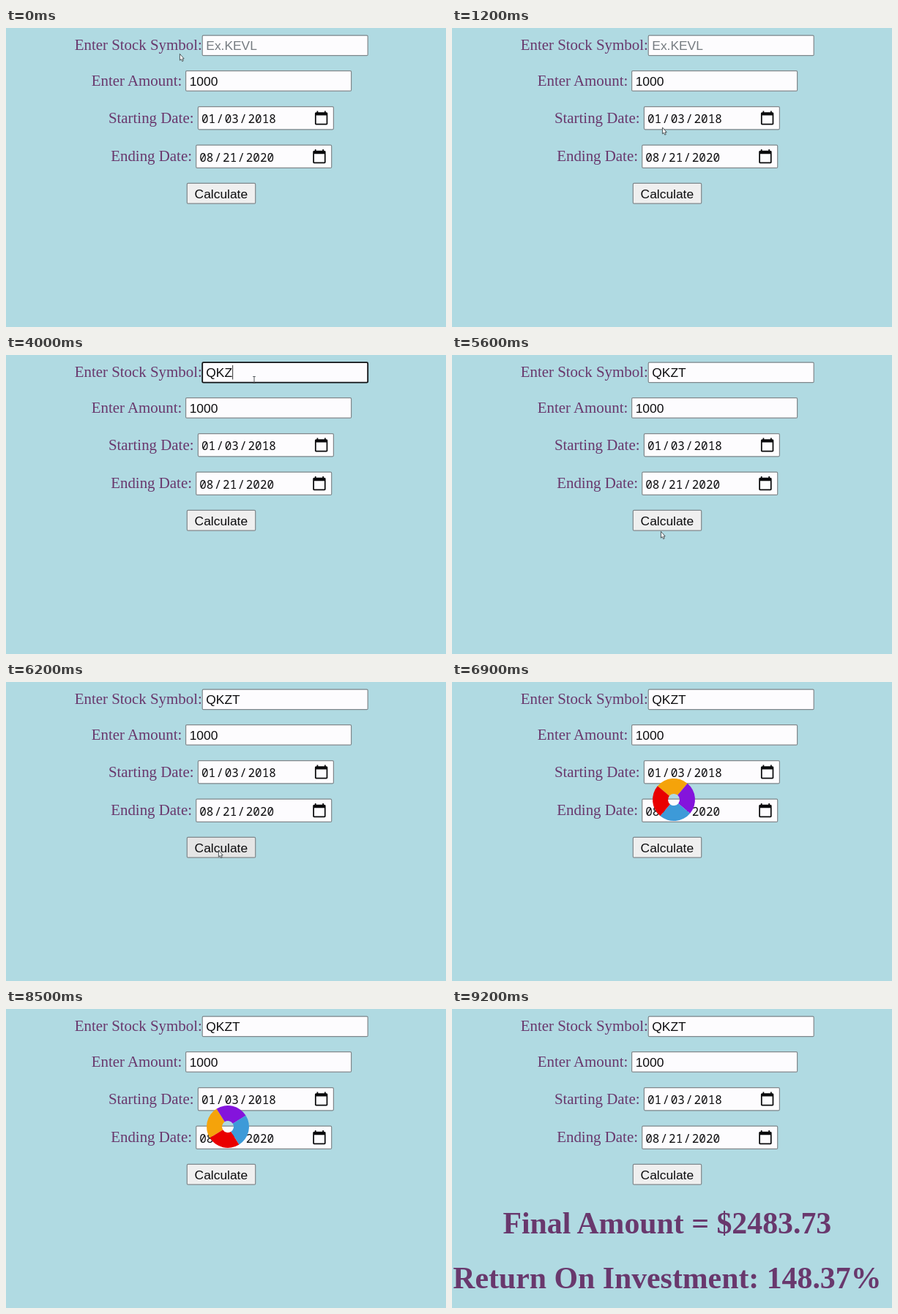
An HTML page that plays this animation: 601x409 px, repeating every 9.3 s.

```html
<!DOCTYPE html>
<html lang="en">
<head>
<meta charset="utf-8">
<title>Investment calculator</title>
<style>
  html, body { margin: 0; width: 100%; height: 100%; overflow: hidden; background: #b0dae2; }
  svg { display: block; width: 601px; height: 409px; }
  text { white-space: pre; }
  .label { font: 20.9px "Liberation Serif", "Times New Roman", serif; fill: #69386d; }
  .result { font: bold 41.8px "Liberation Serif", "Times New Roman", serif; fill: #69386d; }
  .field { font: 17.4px "Liberation Sans", Arial, sans-serif; fill: #0c0c0e; }
  .date { font: 15.95px "Noto Sans Mono", "DejaVu Sans Mono", monospace; fill: #0c0c0e; }
  .box { fill: #fdfcfe; stroke: #80878b; stroke-width: 1.2; }
</style>
</head>
<body>
<svg viewBox="0 0 601 409">
  <rect width="601" height="409" fill="#b0dae2"/>

  <text class="label" x="93.7" y="30">Enter Stock Symbol:</text>
  <rect id="symbolBox" class="box" x="268.2" y="10.2" width="226" height="27.5" rx="1.5"/>
  <text id="symbol" class="field" x="273.3" y="30"></text>
  <path id="caret" d="M310.3 14V33.5" stroke="#333" stroke-width="1"/>

  <text class="label" x="116.7" y="79">Enter Amount:</text>
  <rect class="box" x="245.6" y="58.6" width="226" height="27.6" rx="1.5"/>
  <text class="field" x="250.7" y="79">1000</text>

  <text class="label" x="139.9" y="130">Starting Date:</text>
  <g id="startDate" transform="translate(262 107)"></g>

  <text class="label" x="143.2" y="182">Ending Date:</text>
  <g id="endDate" transform="translate(259.3 159.6)"></g>

  <rect id="button" x="247.3" y="212.4" width="93.4" height="27.8" rx="1.5" stroke="#80878b" stroke-width="1.2"/>
  <text class="field" x="257.6" y="232.8">Calculate</text>

  <g id="results">
    <text class="result" x="69.4" y="307">Final Amount = $2483.73</text>
    <text class="result" x="1.3" y="382.4">Return On Investment: 148.37%</text>
  </g>

  <g id="spinner"></g>

  <g id="pointer">
    <path id="arrow" d="M.4 .4V9.2L2.3 7.6L3.7 10.6L5.2 9.9L3.9 7H6.2Z" fill="#fff" stroke="#3c4448" stroke-width=".9"/>
    <path id="beam" d="M-1.8 -4.5H1.8M0 -4.5V4.5M-1.8 4.5H1.8" fill="none" stroke="#555b5e" stroke-width="1"/>
  </g>
</svg>
<script>
const LOOP = 9300, STEP = 100;
const $ = id => document.getElementById(id);
const show = (id, on) => $(id).setAttribute("visibility", on ? "visible" : "hidden");

const calendar = "M20 3h-1V1h-2v2H7V1H5v2H4c-1.1 0-2 .9-2 2v16c0 1.1.9 2 2 2h16c1.1 0 2-.9 2-2V5c0-1.1-.9-2-2-2zm0 18H4V8h16v13z";

function dateField(id, month, day, year) {
  const parts = [[5, month], [25.4, "/"], [36.8, day], [57.2, "/"], [68.5, year]];
  $(id).innerHTML = `<rect class="box" x=".4" y=".6" width="185" height="31.2" rx="1.5"/>` +
    parts.map(([x, s]) => `<text class="date" x="${x}" y="23">${s}</text>`).join("") +
    `<path d="${calendar}" transform="translate(158.2 5.6) scale(.87)" fill="#0a0a0c"/>`;
}
dateField("startDate", "01", "03", "2018");
dateField("endDate", "08", "21", "2020");

// Four quarter wedges around an open centre, clockwise
$("spinner").innerHTML = ["#f5a30a", "#8414dc", "#3d9ad8", "#e90000"].map((color, i) =>
  `<path d="M0 -29A29 29 0 0 1 29 0H8A8 8 0 0 0 0 -8Z" fill="${color}" transform="rotate(${i * 90})"/>`).join("");

// Pointer path: time, x, y
const path = [
  [0, 237, 35], [100, 237, 35], [400, 262, 62], [600, 262, 62], [1000, 280, 118],
  [1500, 300, 168], [1700, 380, 172], [2000, 545, 140], [2400, 433, 102], [2600, 425, 92],
  [3000, 342, 30], [3200, 339, 34], [4300, 339, 34], [4600, 410, 70], [4900, 555, 160],
  [5300, 380, 246], [5600, 285, 241], [5900, 284, 240], [6200, 290, 230], [6500, 290, 230]
];

// Typed text: start time, value
const typing = [[0, ""], [3500, "Q"], [3700, "QK"], [3900, "QKZ"], [4200, "QKZT"]];

const FOCUS = 3000, BLUR = 5500, CLICK = 6500, DONE = 8700;
const ease = k => k * k * (3 - 2 * k);
const within = (x, y, l, t, r, b) => x >= l && x <= r && y >= t && y <= b;

function pointerAt(t) {
  const i = path.findIndex(p => p[0] > t);
  if (i < 0) return path[path.length - 1].slice(1);
  const [t0, x0, y0] = path[i - 1], [t1, x1, y1] = path[i];
  const k = ease((t - t0) / (t1 - t0));
  return [x0 + (x1 - x0) * k, y0 + (y1 - y0) * k];
}

function draw(t) {
  const [x, y] = pointerAt(t);
  const moving = t < CLICK;
  const overText = within(x, y, 268, 10, 494, 38) || within(x, y, 245, 58, 472, 86);
  $("pointer").setAttribute("transform", `translate(${x} ${y})`);
  show("arrow", moving && !overText);
  show("beam", moving && overText);
  $("button").setAttribute("fill", moving && within(x, y, 247, 212, 341, 240) ? "#e5e5e5" : "#efefef");

  const typed = typing.filter(s => s[0] <= t).pop()[1];
  const symbol = $("symbol");
  symbol.textContent = typed || "Ex.KEVL";
  symbol.style.fill = typed ? "" : "#757b80";

  const focused = t >= FOCUS && t < BLUR;
  const box = $("symbolBox");
  box.style.stroke = focused ? "#101214" : "";
  box.style.strokeWidth = focused ? 1.8 : "";
  const end = typed ? symbol.getComputedTextLength() : 0;
  $("caret").setAttribute("transform", `translate(${end - 36.4} 0)`);
  const since = t < 4200 ? 0 : t - 4200;
  show("caret", focused && since % 1000 < 500);

  show("spinner", t >= CLICK && t < DONE);
  $("spinner").setAttribute("transform", `translate(303 161) rotate(${-50 + (t - 6900) * 0.18})`);
  show("results", t >= DONE);
}

const start = performance.now();
function tick() {
  const t = Math.max(0, performance.now() - start) % LOOP;
  draw(Math.floor(t / STEP) * STEP);
  requestAnimationFrame(tick);
}
tick();
</script>
</body>
</html>
```
